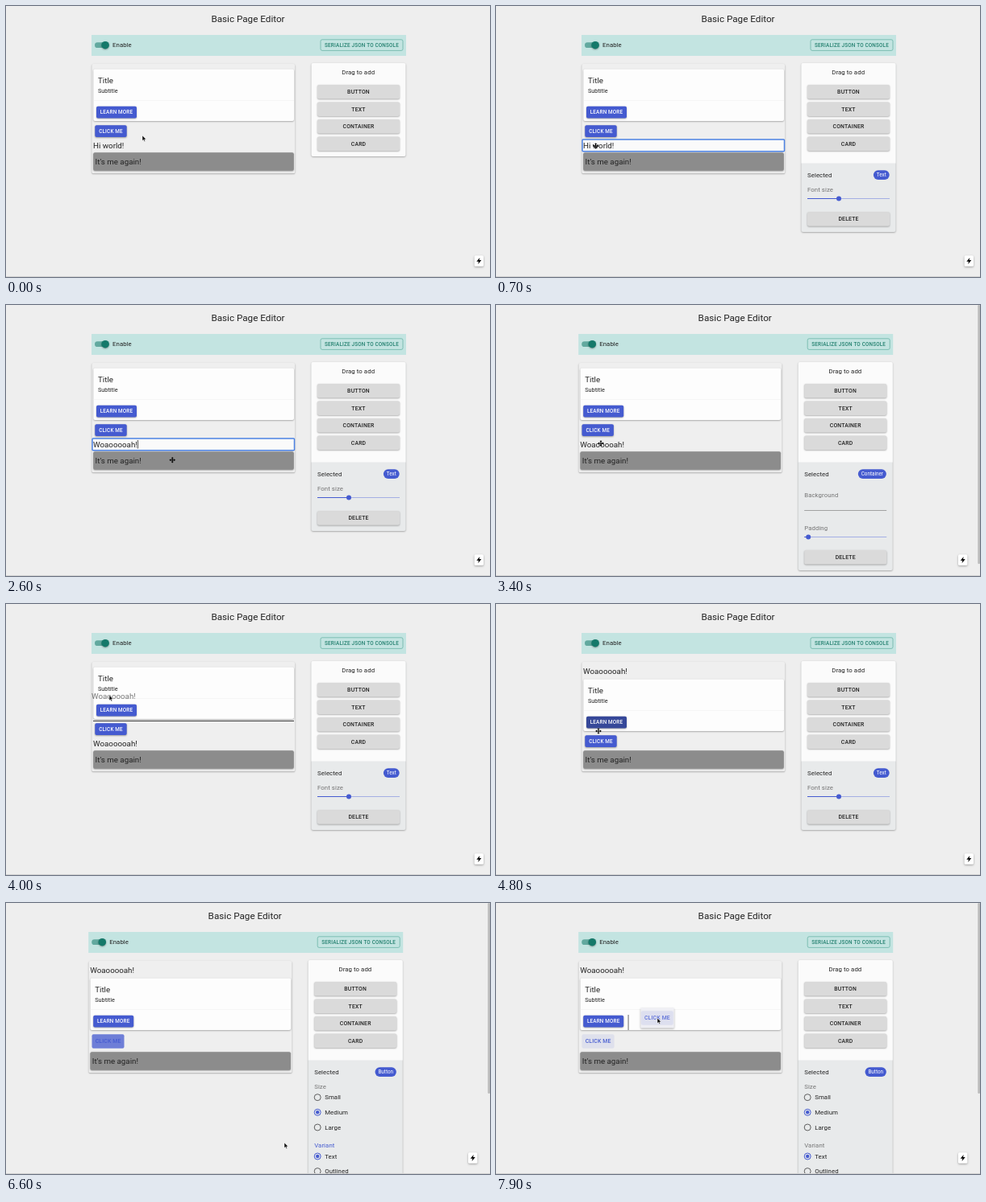
An HTML page with a canvas for the animation above (8 s loop, 600x337 px).

```html
<!DOCTYPE html>
<html lang="en">
<head>
<meta charset="utf-8">
<title>Basic Page Editor</title>
<style>
html, body { margin: 0; width: 100%; height: 100%; overflow: hidden; background: #eee; }
canvas { display: block; width: 600px; height: 337px; }
</style>
</head>
<body>
<canvas id="stage"></canvas>
<script>
const LOOP = 8000, STEP = 100;
const BLUE = '#455bd0', NAVY = '#364899', TEAL = '#15796a', INK = '#222', GRAY = '#757575';
const BODY = 7.8, HEAD = 9.75, SMALL = 6.34, MEDIUM = 6.83;

const canvas = document.getElementById('stage');
const ctx = canvas.getContext('2d');
const dpr = window.devicePixelRatio || 1;
canvas.width = Math.round(600 * dpr);
canvas.height = Math.round(337 * dpr);

// time, x, y, shape
const pointerPath = [
  [0, 169, 161, 'arrow'], [300, 150, 172, 'move'], [500, 147, 174, 'move'],
  [800, 112, 174, 'move'], [1000, 112, 174, 'none'], [2000, 112, 174, 'move'],
  [2500, 205, 192, 'move'], [2900, 210, 195, 'move'], [3400, 130, 172, 'move'],
  [3600, 130, 172, 'arrow'], [4200, 127, 84, 'arrow'], [4400, 127, 82, 'arrow'],
  [4500, 127, 84, 'move'], [4800, 127, 158, 'move'], [4900, 127, 168, 'move'],
  [5200, 129, 171, 'arrow'], [5500, 374, 239, 'arrow'], [5800, 386, 260, 'arrow'],
  [6000, 386, 261, 'arrow'], [6300, 386, 313, 'arrow'], [6500, 383, 314, 'arrow'],
  [6600, 345, 298, 'arrow'], [7200, 136, 173, 'move'], [7400, 130.5, 172, 'arrow'],
  [7900, 200, 143, 'arrow'], [8000, 200, 143, 'arrow']
];

function pointerAt(t) {
  let i = 0;
  while (i < pointerPath.length - 2 && pointerPath[i + 1][0] <= t) i++;
  const a = pointerPath[i], b = pointerPath[i + 1];
  const p = Math.min(1, (t - a[0]) / (b[0] - a[0]));
  return { x: a[1] + (b[1] - a[1]) * p, y: a[2] + (b[2] - a[2]) * p, shape: a[3] };
}

function box(x, y, w, h, r, fill, depth = 0) {
  ctx.save();
  if (depth) {
    ctx.shadowColor = 'rgba(0,0,0,.34)';
    ctx.shadowBlur = 2 * depth * dpr;
    ctx.shadowOffsetY = 0.8 * depth * dpr;
  }
  ctx.fillStyle = fill;
  ctx.beginPath();
  ctx.roundRect(x, y, w, h, r);
  ctx.fill();
  ctx.restore();
}

function outline(x, y, w, h, r, color, width) {
  ctx.strokeStyle = color;
  ctx.lineWidth = width;
  ctx.beginPath();
  ctx.roundRect(x, y, w, h, r);
  ctx.stroke();
}

// y is the middle of the capitals
function text(s, x, y, size, color = INK, align = 'left', weight = 400, spacing = 0) {
  ctx.font = `${weight} ${size}px Roboto, sans-serif`;
  ctx.letterSpacing = spacing * size + 'px';
  ctx.textAlign = align;
  ctx.fillStyle = color;
  ctx.fillText(s, x, y + size * 0.356);
  return ctx.measureText(s).width;
}

function body(s, x, y, color, align) {
  text(s, x, y, BODY, color, align, 400, 0.0094);
}

function caps(s, x, y, size, color) {
  text(s, x, y, size, color, 'center', 500, 0.0286);
}

function dot(x, y, r, color) {
  ctx.fillStyle = color;
  ctx.beginPath();
  ctx.arc(x, y, r, 0, 7);
  ctx.fill();
}

function grayButton(label, y) {
  box(386, y - 8.75, 102, 17.5, 2, '#dadada', 1);
  caps(label, 437, y, MEDIUM, INK);
}

function slider(y, x) {
  box(386, y - 0.5, 102, 1, 0, '#a4afe4');
  box(386, y - 0.5, x - 386, 1, 0, BLUE);
  dot(x, y, 3, BLUE);
}

function radio(label, y, on) {
  ctx.strokeStyle = on ? BLUE : '#5e5e5e';
  ctx.lineWidth = 1;
  ctx.beginPath();
  ctx.arc(390, y, 4, 0, 7);
  ctx.stroke();
  if (on) dot(390, y, 2.2, BLUE);
  body(label, 399, y);
}

function header() {
  text('Basic Page Editor', 300, 16, 11.7, INK, 'center');
  box(106, 36, 390, 26, 0, '#c3e4e1');
  box(110, 45.3, 16.6, 6.8, 3.4, '#62a99f');
  box(118.3, 43.9, 9.6, 9.6, 4.8, TEAL, 1);
  body('Enable', 132, 48.7);
  outline(390, 41.8, 102, 13.6, 2, '#5fae9f', 0.7);
  caps('SERIALIZE JSON TO CONSOLE', 441, 48.7, SMALL, '#23806f');
}

function toolbox(panel, t) {
  const open = panel !== 'none';
  const bottom = { none: 187, text: 281, container: 330, button: 420 }[panel];
  box(378.5, 71, 117, bottom - 71, 2, open ? '#e8eaeb' : '#fbfbfb', 1);
  if (open) box(378.5, 71, 117, 124.5, [2, 2, 0, 0], '#fbfbfb');
  body('Drag to add', 436.7, 82.3, INK, 'center');
  ['BUTTON', 'TEXT', 'CONTAINER', 'CARD'].forEach((s, i) => grayButton(s, 106.7 + 21.5 * i));
  if (!open) return;

  body('Selected', 386, 210);
  const name = panel[0].toUpperCase() + panel.slice(1);
  ctx.font = `${SMALL}px Roboto, sans-serif`;
  ctx.letterSpacing = '0px';
  const w = ctx.measureText(name).width + 7.8;
  box(487.7 - w, 204.2, w, 11.7, 5.85, BLUE);
  text(name, 487.7 - w / 2, 210, SMALL, '#fff', 'center');

  if (panel === 'text') {
    body('Font size', 386, 228.6, GRAY);
    slider(239.5, 425);
    grayButton('DELETE', 265);
  } else if (panel === 'container') {
    body('Background', 386, 236.5, GRAY);
    box(386, 255, 102, 0.8, 0, '#8a8a8a');
    body('Padding', 386, 277.3, GRAY);
    slider(288.5, 391);
    grayButton('DELETE', 313.7);
  } else {
    const medium = t >= 5900, plain = t >= 6500;
    body('Size', 386, 228.6, medium && !plain ? BLUE : GRAY);
    radio('Small', 241.7, !medium);
    radio('Medium', 260.3, medium);
    radio('Large', 279, false);
    body('Variant', 386, 301.7, plain && t < 7400 ? BLUE : GRAY);
    radio('Text', 315, plain);
    radio('Outlined', 333.6, false);
  }
}

function card(dy, hover) {
  box(108.3, 78.5 + dy, 248.7, 64.5, 2, '#fdfdfd', 1);
  text('Title', 114, 92.2 + dy, HEAD);
  text('Subtitle', 114, 105.8 + dy, 7.3);
  box(108.3, 117 + dy, 248.7, 0.6, 0, '#eee');
  box(112, 124.7 + dy, 50, 14.8, 2, hover ? NAVY : BLUE, 1);
  caps('LEARN MORE', 137, 132 + dy, SMALL, '#fff');
}

function clickButton(t, dy) {
  if (t < 5900) {
    box(110.3, 148.3 + dy, 39.4, 14.8, 2, t >= 4900 ? NAVY : BLUE, 1);
    caps('CLICK ME', 130, 155.7 + dy, SMALL, '#fff');
  } else if (t < 6500) {
    box(110.3, 163.2, 47.5, 17.5, 2, BLUE, 1);
    caps('CLICK ME', 134.1, 172, MEDIUM, '#fff');
  } else {
    const p = Math.min(1, Math.max(0, (t - 6520) / 250));
    const alpha = 1 - p * p * (3 - 2 * p);
    const tint = t >= 7200 ? 0.1 : 0;
    box(110.3, 163.2, 40, 17.5, 2, `rgba(69,91,208,${Math.max(alpha, tint)})`);
    caps('CLICK ME', 130.4, 172, MEDIUM, BLUE);
  }
}

function message(t, y) {
  const typed = 'Woaooooah!'.slice(0, Math.max(0, Math.floor((t - 900) / 100)));
  const words = t < 1000 ? 'Hi world!' : typed;
  const editing = t >= 500 && t < 2900;
  if (editing) {
    box(107, 166, 250.5, 14.7, 1, '#fafafa');
    outline(107, 166, 250.5, 14.7, 1, '#4c82e4', 1.5);
  }
  if (t >= 800 && t < 1000) box(108, 167.3, 38.5, 12, 0, '#b4d5fe');
  const w = text(words, 108, y, HEAD);
  if (editing && t >= 1000) box(108.4 + w, 168, 0.7, 10.5, 0, '#111');
}

function editor(t) {
  const moved = t >= 4400;
  const dy = moved ? 15 : 0, grow = t >= 5900 ? 3 : 0;
  box(106.3, 72, 252, 136.3 + grow, 2, '#efefef', 0.8);
  card(dy, t >= 4700 && t < 4900);
  clickButton(t, dy);
  message(t, moved ? 83.6 : 173.2);
  box(108.2, 182.2 + grow, 248.6, 22.6, 2, '#8c8c8c', 0.8);
  text("It's me again!", 110.6, 193.4 + grow, HEAD);
}

function dragging(t, at) {
  if (t >= 3600 && t < 4400) {
    ctx.globalAlpha = 0.6;
    text('Woaooooah!', at.x - 22, at.y + 1, HEAD);
    ctx.globalAlpha = 1;
    const y = at.y > 158 ? 165 : at.y > 112 ? 145 : 76;
    box(108, y, 249, 1, 0, '#444');
  }
  if (t >= 7500) {
    const dx = at.x - 130.5, dy = at.y - 172;
    if (at.y < 159) box(167.4, 139, 0.9, 19, 0, '#555');
    else box(110, 182, 248, 0.9, 0, '#555');
    box(109.8 + dx, 159.5 + dy, 41.5, 25, 1, 'rgba(243,243,248,.94)', 1.2);
    box(110.3 + dx, 163.2 + dy, 40, 17.5, 2, 'rgba(69,91,208,.1)');
    caps('CLICK ME', 130.4 + dx, 172 + dy, MEDIUM, '#5b6fd8');
  }
}

function shape(points, fill) {
  ctx.beginPath();
  points.forEach(([x, y]) => ctx.lineTo(x, y));
  ctx.closePath();
  ctx.fillStyle = fill;
  ctx.fill();
}

function badge(x, y) {
  box(x - 5.7, y - 6.7, 11.4, 13.4, 1.5, '#fff', 1.3);
  shape([[x + 1, y - 4], [x - 3, y + 0.7], [x - 0.4, y + 0.7], [x - 1, y + 4],
    [x + 3, y - 0.9], [x + 0.4, y - 0.9]], '#000');
}

function pointer({ x, y, shape: kind }) {
  ctx.save();
  ctx.translate(x, y);
  if (kind === 'arrow') {
    const tip = [[0, 0], [0, 6.6], [1.5, 5.3], [2.5, 7.6], [3.6, 7.1], [2.6, 4.9], [4.6, 4.8]];
    shape(tip, '#000');
    ctx.strokeStyle = '#fff';
    ctx.lineWidth = 0.5;
    ctx.stroke();
  } else if (kind === 'move') {
    box(-2.8, -0.5, 5.6, 1, 0, '#000');
    box(-0.5, -2.8, 1, 5.6, 0, '#000');
    for (let i = 0; i < 4; i++) {
      shape([[3.8, 0], [2, -1.5], [2, 1.5]], '#000');
      ctx.rotate(Math.PI / 2);
    }
  }
  ctx.restore();
}

function panelAt(t) {
  if (t < 400) return 'none';
  if (t >= 2900 && t < 3500) return 'container';
  return t < 5100 ? 'text' : 'button';
}

function draw(t) {
  const panel = panelAt(t);
  const scrolls = panel === 'container' || panel === 'button';
  const shift = scrolls ? 3.8 : 0;
  const at = pointerAt(t);
  ctx.setTransform(dpr, 0, 0, dpr, 0, 0);
  box(0, 0, 600, 337, 0, '#eee');
  ctx.save();
  ctx.translate(-shift, 0);
  header();
  editor(t);
  toolbox(panel, t);
  dragging(t, { x: at.x + shift, y: at.y });
  ctx.restore();
  if (scrolls) box(597.3, 0, 2.7, panel === 'button' ? 237 : 322, 1.3, '#bcbcbc');
  badge(586.3 - shift * 2, 317);
  box(0, 336, 600, 1, 0, '#d2d2d2');
  pointer(at);
}

function tick(now) {
  draw(Math.floor((now % LOOP) / STEP) * STEP);
  requestAnimationFrame(tick);
}
draw(0);
requestAnimationFrame(tick);
</script>
</body>
</html>
```
